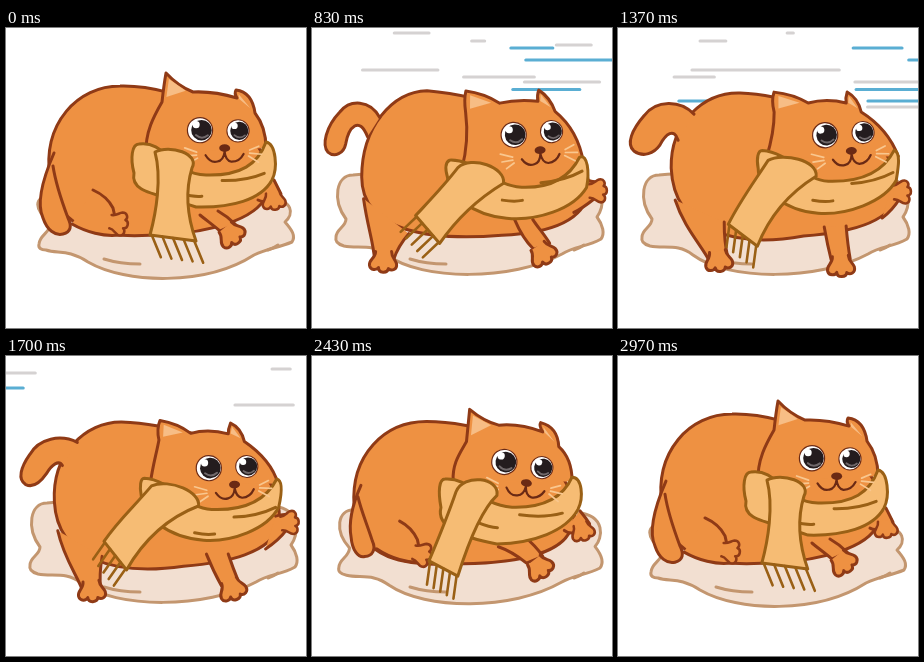
Write an HTML page that moves like this. It is 300 px wide and 300 px high and loops after 3.01 s.

```html
<!DOCTYPE html>
<html lang="en">
<head>
<meta charset="utf-8">
<title>Cat on a pillow in the wind</title>
<style>
html, body { margin: 0; width: 100%; height: 100%; overflow: hidden; background: #fff; }
svg { display: block; width: 100vw; height: 100vh; }
path { stroke-linejoin: round; stroke-linecap: round; stroke-width: 3; }
.fur { fill: #ee9142; stroke: #8f3a16; }
.scarf { fill: #f6bc74; stroke: #9a6015; }
.pillow { fill: #f2dfd1; stroke: #c3966f; }
.line { fill: none; }
</style>
</head>
<body>
<svg viewBox="0 0 300 300">
  <defs>
    <path id="paw" d="M-8 -9C-8 -2 -15 -1 -14 5C-13 10 -7 10 -5 7C-5 13 4 13 5 8C8 11 14 9 13 3C12 -1 8 -3 8 -9"/>
    <g id="eye">
      <circle r="12.6" fill="#fff" stroke="#6b2a14" stroke-width="1.2"/>
      <circle cx="1.5" r="10.3" fill="#241c1e"/>
      <path d="M-4 5Q2 10 8 5" class="line" stroke="#70686a" style="stroke-width:2"/>
      <circle cx="-4" cy="-5.5" r="3.6" fill="#fff"/>
    </g>
  </defs>
  <g id="wind" stroke-width="3"></g>
  <path id="pillow" class="pillow"/>
  <path class="pillow line" d="M98 231Q114 236 134 236M262 222Q268 220 272 217"/>
  <path id="body" class="fur"/>
  <path id="tail" class="fur"/>
  <path id="leg" class="fur"/>
  <use id="legPaw" href="#paw" class="fur"/>
  <path id="arm" class="fur"/>
  <use id="armPaw" href="#paw" class="fur"/>
  <path id="far" class="fur"/>
  <use id="farPaw" href="#paw" class="fur"/>
  <path id="head" class="fur"/>
  <path id="ears" fill="#f7bd85"/>
  <path id="band" class="scarf"/>
  <g id="face">
    <path class="line" stroke="#f9c78f" style="stroke-width:1.7" d="M-34 18L-22 22M-33 26L-22 25M-29 33L-21 28M31 19L40 15M31 22L43 23M30 25L40 31"/>
    <use href="#eye" x="-19"/>
    <use href="#eye" transform="translate(19) scale(.88)"/>
    <path class="line" stroke="#6b2a14" style="stroke-width:2.2" d="M-13 25Q-8 33 -1 31Q5 30 6 21Q7 30 13 31Q21 31 25 23"/>
    <ellipse cx="6" cy="17.5" rx="5.5" ry="3.8" fill="#6b2a14"/>
    <path class="scarf" style="fill:none" d="M-36 64Q-24 67 -16 66M4 50Q28 50 46 42"/>
  </g>
  <path id="strip" class="scarf"/>
  <path id="fringe" class="scarf" style="stroke-width:2.6"/>
</svg>
<script>
const LOOP = 3010, STEP = LOOP / 90;
const $ = id => document.getElementById(id);

const flat = "M33 216C34 206 44 206 45 194C27 182 28 168 44 168C90 166 200 166 262 170C288 172 288 186 279 194C286 202 290 208 286 214C272 220 262 220 248 227C200 258 120 256 82 234C62 221 52 226 40 222C35 222 32 220 33 216Z";
const puffed = "M24 209C24 201 34 199 34 191C20 172 24 147 41 147C90 143 200 143 268 150C297 154 292 180 285 189C291 197 293 206 289 211C275 219 263 218 250 226C200 253 110 253 75 227C60 215 46 221 32 218C25 216 23 213 24 209Z";

const rest = {
  puff: "0",
  body: "M44 150C36 95 72 58 114 58C150 57 180 70 205 80C240 95 278 140 260 168C250 192 200 205 160 206C100 212 50 205 44 150",
  tail: "M48 125C38 148 30 175 37 190C41 202 49 208 57 206C65 204 66 198 62 190C56 174 50 158 47 138",
  leg: "M87 162C96 166 103 172 107 180L113 207C98 209 80 204 66 196",
  legPaw: "translate(112,195) rotate(-80) scale(.85)",
  arm: "M194 187C200 192 207 197 214 203L229 196C224 191 219 187 212 183",
  armPaw: "translate(225,206) rotate(-40)",
  far: "M252 172C256 174 259 174 262 172L275 166C272 160 270 156 268 152",
  farPaw: "translate(268,172) rotate(-10) scale(.85)",
  head: "M140 126C139 104 148 88 156 74Q158 56 160 45Q172 58 187 64Q208 63 231 70Q228 65 230 62Q246 64 249 85C256 94 260 104 260 120",
  face: "translate(213,102.5) rotate(1)",
  band: "M133 116C160 112 165 146 200 147C235 148 252 136 260 114C270 116 272 140 266 152C255 172 225 180 190 179C150 165 124 165 128 145C124 130 126 116 133 116Z",
  strip: "M149 124C164 116 194 126 186 140C180 160 180 185 190 213L144 207C150 185 156 150 149 124Z",
  hang: "9 22"
};

const stand = {
  puff: "1",
  body: "M44 120C44 80 80 56 120 55C150 54 180 66 205 78C245 92 278 125 262 148C252 174 215 187 180 188C140 192 46 200 44 120",
  tail: "M66 78C56 62 36 60 22 68C8 78 6 98 14 104C22 110 30 106 32 98C34 86 40 80 46 83C50 85 52 88 56 96",
  leg: "M98 187C97 198 95 206 93 215L73 216C64 194 50 170 45 140",
  legPaw: "translate(81,219) rotate(0) scale(1)",
  arm: "M196 186C199 195 202 202 207 209L225 206C222 198 220 190 218 180",
  armPaw: "translate(217,214) rotate(-5)",
  far: "M258 148C264 150 270 154 276 160L288 148C282 143 275 138 266 134",
  farPaw: "translate(283,154) rotate(-35) scale(.9)",
  head: "M143 112C142 96 143 84 146 72Q148 52 152 40Q166 50 181 53Q202 51 225 55Q221 46 223 41Q240 50 243 66C256 80 262 98 262 116",
  face: "translate(214,86) rotate(-3)",
  band: "M133 103C158 104 165 134 200 136C238 138 252 124 261 104C270 104 271 128 265 142C255 160 215 168 185 166C150 160 122 156 128 138C124 122 127 104 133 103Z",
  strip: "M146 126C152 106 190 110 185 130C170 148 162 178 156 202L125 184C132 166 140 146 146 126Z",
  hang: "-3 23"
};

const gust = {
  puff: "1",
  body: "M50 150C50 100 80 64 115 63C150 66 180 75 205 82C245 95 280 130 277 165C272 196 235 206 190 208C120 214 50 205 50 150",
  tail: "M68 90C58 72 38 72 28 85C14 100 10 118 16 125C23 131 32 126 34 117C37 100 48 88 56 110",
  leg: "M97 206C90 214 85 222 82 232L63 232C62 215 56 200 52 172",
  legPaw: "translate(72,233) rotate(0) scale(1)",
  arm: "M203 192C208 204 214 214 222 222L238 216C232 206 226 200 221 192",
  armPaw: "translate(231,226) rotate(-35)",
  far: "M262 186C270 182 277 176 284 170L288 156C284 154 280 153 274 154",
  farPaw: "translate(285,163) rotate(-95) scale(.85)",
  head: "M150 142C156 120 156 100 154 85Q152 72 154 64Q172 66 188 76Q205 72 226 74Q225 68 227 63Q238 70 243 84C258 96 268 112 272 135",
  face: "translate(221,106) rotate(-5)",
  band: "M138 133C165 132 180 158 210 160C240 161 258 150 268 130C276 126 278 145 275 160C262 182 225 194 195 191C160 188 135 165 136 150C133 140 134 135 138 133Z",
  strip: "M146 140C160 128 194 140 192 156C165 172 145 190 127 216L103 188C118 172 132 158 146 140Z",
  hang: "-16 15"
};

const strongGust = {
  puff: "1",
  body: "M53 140C52 95 85 64 122 65C152 66 180 75 210 82C250 95 282 130 278 168C272 196 225 205 185 208C120 220 56 205 53 140",
  tail: "M76 86C62 72 38 72 26 88C14 102 8 116 16 123C26 130 36 125 42 117C48 106 56 100 60 112",
  leg: "M106 194C106 208 107 218 110 230L92 234C84 218 66 200 57 172",
  legPaw: "translate(101,232) rotate(-10) scale(1)",
  arm: "M206 199C208 210 210 220 213 232L232 231C230 220 229 210 228 198",
  armPaw: "translate(223,237) rotate(-5)",
  far: "M264 190C272 184 277 178 282 170L286 158C284 156 280 155 274 156",
  farPaw: "translate(283,164) rotate(-95) scale(.85)",
  head: "M148 130C154 110 156 98 156 84Q153 72 156 64Q175 66 190 75Q208 70 228 75Q227 70 229 64Q240 70 243 84C262 96 274 112 280 128",
  face: "translate(226,106) rotate(-4)",
  band: "M144 122C172 124 185 152 210 153C245 154 266 142 276 122C283 124 280 140 278 152C266 174 228 187 200 185C165 182 140 160 140 140C138 130 140 122 144 122Z",
  strip: "M150 132C165 124 200 132 198 148C170 165 150 190 139 218L110 196C122 172 135 155 150 132Z",
  hang: "-3 22"
};

const lull = {
  puff: "1",
  body: "M42 150C38 100 72 66 108 65C145 66 175 75 205 82C245 100 272 130 265 165C258 195 215 205 170 209C100 215 45 200 42 150",
  tail: "M64 86C46 82 28 90 21 105C15 115 14 128 23 131C30 132 33 122 36 115C40 106 46 102 50 102",
  leg: "M84 207C79 216 75 224 73 232L55 233C52 215 46 200 44 172",
  legPaw: "translate(64,234) rotate(0) scale(1)",
  arm: "M193 194C200 204 208 214 218 222L232 212C226 206 220 200 214 194",
  armPaw: "translate(230,223) rotate(-45)",
  far: "M254 188C264 184 272 180 280 174L286 160C280 158 272 158 264 160",
  farPaw: "translate(283,167) rotate(-90) scale(.85)",
  head: "M140 125C138 108 143 95 148 82Q147 70 151 61Q166 66 178 76Q195 72 216 77Q216 72 219 66Q230 70 234 84C248 96 258 108 260 126",
  face: "translate(215,113) rotate(-1)",
  band: "M130 121C158 122 168 150 200 152C235 154 252 142 262 122C269 122 269 138 265 150C254 172 220 183 192 181C155 178 128 160 128 140C126 130 126 122 130 121Z",
  strip: "M140 128C160 118 188 138 184 150C150 158 125 180 104 207L88 172C105 155 122 145 140 128Z",
  hang: "-22 11"
};

const settle = {
  puff: ".65",
  body: "M42 152C38 100 72 66 114 66C148 66 175 75 205 82C240 98 276 145 258 176C248 200 200 208 150 209C90 212 46 205 42 152",
  tail: "M48 132C40 152 36 172 40 188C42 200 48 208 55 206C63 205 66 198 62 190C56 172 50 160 46 144",
  leg: "M87 164C96 168 102 174 106 182L112 206C98 208 80 204 66 196",
  legPaw: "translate(111,197) rotate(-80) scale(.85)",
  arm: "M186 191C196 194 206 200 215 207L231 200C226 192 218 185 210 179",
  armPaw: "translate(228,211) rotate(-40)",
  far: "M252 176C256 179 259 179 263 177L277 169C274 164 271 160 268 156",
  farPaw: "translate(270,176) rotate(-20) scale(.85)",
  head: "M141 126C140 108 148 98 155 86Q157 66 158 54Q172 66 187 70Q208 68 231 77Q227 71 229 68Q246 72 247 92C256 100 260 112 260 126",
  face: "translate(211,110) rotate(9)",
  band: "M133 124C160 122 165 150 200 152C234 153 252 140 260 122C270 122 272 142 266 154C254 176 222 188 185 189C150 182 124 172 129 152C126 136 127 124 133 124Z",
  strip: "M144 136C152 118 188 122 185 140C170 154 158 182 146 221L117 206C128 180 136 160 144 136Z",
  hang: "-3 23"
};

const keys = [
  [0, rest], [430, stand], [830, gust], [1370, strongGust],
  [2030, lull], [2230, stand], [2430, settle], [2970, rest]
];
const LAST = keys.length - 1;

// y, x and length early in the gust, x and length late in it, colour
const streaks = [
  [5, 55, 35, 137, 6, 0], [13, 124, 13, 40, 26, 0], [20, 169, 42, 200, 49, 1],
  [17, 217, 35, 298, 30, 0], [32, 186, 94, 258, 25, 1], [42, 20, 75, 38, 148, 0],
  [49, 115, 71, 13, 40, 0], [54, 182, 75, 201, 100, 0], [61.5, 171, 67, 203, 77, 1],
  [73, 320, 60, 5, 67, 1], [73, 400, 90, 201, 100, 1], [79, 410, 90, 200, 100, 0]
];
const SPAN = 620;

const clamp = v => Math.min(1, Math.max(0, v));
const mod = (v, n) => (v % n + n) % n;
const NUM = /-?\d*\.?\d+/g;
const nums = s => s.match(NUM).map(Number);

// Weighted sum of strings that differ only in their numbers
function blend(strings, weights) {
  const lists = strings.map(nums);
  let i = 0;
  return strings[0].replace(NUM, () => {
    const v = lists.reduce((sum, list, j) => sum + list[i] * weights[j], 0);
    i++;
    return +v.toFixed(2);
  });
}

// Smooth curve through the keys, at rest at both ends
function poseAt(t) {
  const i = Math.min(keys.findLastIndex(k => k[0] <= t), LAST - 1);
  const around = [i - 1, i, i + 1, i + 2].map(j => keys[Math.min(LAST, Math.max(0, j))]);
  const [ta, tb, tc, td] = around.map(k => k[0]);
  const span = tc - tb, u = clamp((t - tb) / span);
  const into = i === 0 ? 0 : u * (1 - u) ** 2 * span / (tc - ta);
  const out = i + 1 === LAST ? 0 : u * u * (u - 1) * span / (td - tb);
  const ease = u * u * (3 - 2 * u);
  const weights = [-into, 1 - ease - out, ease + into, out];
  return name => blend(around.map(k => k[1][name]), weights);
}

function triangle(n, ids) {
  const p = ids.map(i => [n[i], n[i + 1]]);
  const c = [0, 1].map(j => (p[0][j] + p[1][j] + p[2][j]) / 3);
  return "M" + p.map(q => q.map((v, j) => c[j] + (v - c[j]) * .62)).join("L") + "Z";
}

function drawWind(t) {
  const show = clamp((t - 540) / 120) * clamp((2070 - t) / 220);
  const u = (t - 830) / 540, stretch = (1 - Math.cos(Math.PI * u)) / 2;
  $("wind").setAttribute("opacity", show);
  $("wind").innerHTML = streaks.map(([y, x0, w0, x1, w1, blue]) => {
    const x = mod(x0 + (x1 - x0 - SPAN) * u + 160, SPAN) - 160;
    const end = x + w0 + (w1 - w0) * stretch;
    return `<path d="M${x} ${y}H${end}" stroke="${blue ? "#5aaed3" : "#d5d2d2"}"/>`;
  }).join("");
}

function draw(t) {
  const now = poseAt(t);
  const shape = (id, d) => $(id).setAttribute("d", d);

  drawWind(t);
  const puff = +now("puff");
  shape("pillow", blend([flat, puffed], [1 - puff, puff]));
  for (const id of ["body", "tail", "leg", "arm", "far", "head", "band", "strip"]) shape(id, now(id));
  for (const id of ["legPaw", "armPaw", "farPaw", "face"]) $(id).setAttribute("transform", now(id));

  const h = nums(now("head"));
  shape("ears", triangle(h, [6, 10, 14]) + triangle(h, [18, 22, 26]));

  const [rx, ry, lx, ly] = nums(now("strip")).slice(12, 16);
  const [dx, dy] = nums(now("hang"));
  shape("fringe", [.04, .27, .5, .73, .96].map(f =>
    `M${lx + (rx - lx) * f} ${ly + (ry - ly) * f}l${dx} ${dy}`).join(""));
}

const start = performance.now();
function tick() {
  const t = mod(performance.now() - start, LOOP);
  draw(Math.floor(t / STEP) * STEP);
  requestAnimationFrame(tick);
}
tick();
</script>
</body>
</html>
```
